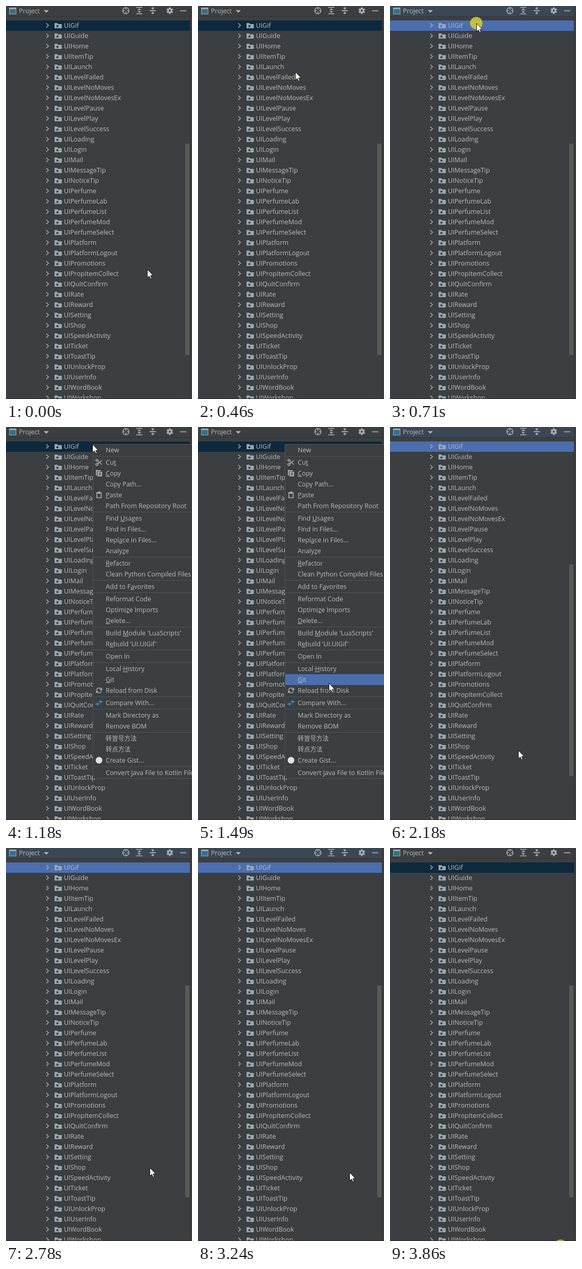
Recreate the animation shown at these times as an HTML page with a canvas. Size 360 by 760 pixels, loop 3950 ms.

```html
<!DOCTYPE html>
<html lang="en">
<head>
<meta charset="utf-8">
<title>Project tree</title>
<style>
html, body { margin: 0; width: 100%; height: 100%; overflow: hidden; background: #3c3f41; }
canvas { display: block; width: 360px; height: 760px; }
</style>
</head>
<body>
<canvas id="stage"></canvas>
<script>
const W = 360, H = 760, LOOP = 3950, TICK = 77;
const canvas = document.getElementById('stage');
const dpr = window.devicePixelRatio || 1;
canvas.width = W * dpr;
canvas.height = H * dpr;
const c = canvas.getContext('2d');

const BG = '#3c3f41', TEXT = '#bbbbbb', ICON = '#afb1b3', FOLDER = '#9aa7b0';
const BLUE = '#4b6eaf', NAVY = '#0d293e', LINE = '#515355', DARK = '#323436', SKY = '#3592c4';
const FONT = '12.5px "Open Sans", "Noto Sans", sans-serif';
const CJK = '12px "Noto Sans CJK SC", "Noto Sans CJK", sans-serif';

const names = ('Gif Guide Home ItemTip Launch LevelFailed LevelNoMoves LevelNoMovesEx LevelPause ' +
  'LevelPlay LevelSuccess Loading Login Mail MessageTip NoticeTip Perfume PerfumeLab PerfumeList ' +
  'PerfumeMod PerfumeSelect Platform PlatformLogout Promotions PropItemCollect QuitConfirm Rate ' +
  'Reward Setting Shop SpeedActivity Ticket ToastTip UnlockProp UserInfo WordBook Workshop')
  .split(' ').map(n => 'UI' + n);

// "-" is a separator, "_" marks the mnemonic letter
const items = ("New|-|Cu_t|_Copy|Copy Path...|_Paste|Path From Repository Root|-|Find _Usages|" +
  "Find in Files...|Repl_ace in Files...|Analy_ze|-|_Refactor|Clean Python Compiled Files|-|" +
  "Add to F_avorites|-|Reformat Code|Optimi_ze Imports|_Delete...|-|Build _Module 'LuaScripts'|" +
  "R_ebuild 'UI.UIGif'|-|Open In|-|Local _History|_Git|Reload from Disk|-|Compare With...|-|" +
  "Mark Directory as|Remove BOM|-|转冒号方法|转点方法|Create Gist...|-|Convert Java File to Kotlin File").split('|');

const smooth = u => u * u * (3 - 2 * u);
const speedUp = u => u * u;
const slowDown = u => 1 - (1 - u) ** 3;
const drift = u => u ** 1.15;

// Pointer moves, timed in ticks
const home = { x: 273, y: 509 };
const moves = [
  { from: 0, to: 7, x: 167, y: 33, ease: smooth },
  { from: 15, to: 19, x: 253, y: 495, ease: speedUp },
  { from: 19, to: 25, x: 248, y: 625, ease: slowDown },
  { from: 31, to: 32, x: 276, y: 620, ease: smooth },
  { from: 35, to: 39, x: 288, y: 606, ease: smooth },
  { from: 41, to: 47, x: 330, y: 769, ease: drift }
];

function pointerAt(tick) {
  let { x, y } = home;
  for (const m of moves) {
    const k = m.ease(Math.min(1, Math.max(0, (tick - m.from) / (m.to - m.from))));
    x += (m.x - x) * k;
    y += (m.y - y) * k;
  }
  return [Math.round(x), Math.round(y)];
}

function rect(x, y, w, h, color = ICON) {
  c.fillStyle = color;
  c.fillRect(x, y, w, h);
}

function trace(points) {
  c.beginPath();
  for (let i = 0; i < points.length; i += 2) c.lineTo(points[i], points[i + 1]);
}

function poly(points, color = ICON) {
  trace(points);
  c.closePath();
  c.fillStyle = color;
  c.fill();
}

function line(points, width = 1.5) {
  trace(points);
  c.strokeStyle = ICON;
  c.lineWidth = width;
  c.stroke();
}

function disc(x, y, r, color) {
  c.beginPath();
  c.arc(x, y, r, 0, Math.PI * 2);
  c.fillStyle = color;
  c.fill();
}

function arc(x, y, r, from = 0, to = 2) {
  c.beginPath();
  c.arc(x, y, r, from * Math.PI, to * Math.PI);
  c.strokeStyle = ICON;
  c.lineWidth = 1.5;
  c.stroke();
}

function label(str, x, y, font = FONT) {
  c.font = font;
  c.fillStyle = TEXT;
  c.fillText(str, x, y);
}

function at(x, y, paint) {
  c.save();
  c.translate(x, y);
  paint();
  c.restore();
}

// Paints the same shape n times around the current centre
function spin(n, paint, turn = 2 * Math.PI / n) {
  for (let i = 0; i < n; i++) {
    paint();
    c.rotate(turn);
  }
}

function header(focused) {
  const bg = focused ? '#3b4754' : BG;
  rect(0, 0, 356, 20, bg);
  rect(0, 20, 356, 1, DARK);
  rect(6, 3, 14, 13, FOLDER);
  rect(7, 6, 12, 9, '#34718a');
  label('Project', 25, 14);
  poly([73, 8, 83, 8, 78, 13]);

  at(232, 9, () => {
    arc(0, 0, 6);
    spin(4, () => rect(-0.75, 2, 1.5, 4));
  });
  at(258, 9, () => spin(2, () => {
    rect(-6, -7, 12, 1.5);
    poly([0, -4.5, 3.5, -1, -3.5, -1]);
  }));
  at(284, 9, () => spin(2, () => {
    rect(-6, -0.75, 12, 1.5);
    rect(-0.7, -7, 1.4, 2);
    poly([0, -2, 3.5, -5.5, -3.5, -5.5]);
  }));
  at(317, 9, () => {
    spin(6, () => rect(-1.5, -6.5, 3, 4));
    disc(0, 0, 4.8, ICON);
    disc(0, 0, 2, bg);
  });
  rect(337, 8.5, 12, 1.6);
}

function tree(focused) {
  const rowColor = focused ? BLUE : NAVY;
  rect(0, 28, 356, 20, rowColor);
  names.forEach((name, i) => {
    at(0, 38 + i * 20, () => {
      line([78, -4.5, 82.3, -0.5, 78, 3.5], 1.4);
      poly([94, -5, 99, -5, 101, -3, 108, -3, 108, 5, 94, 5], FOLDER);
      disc(99.5, 1, 2, i ? '#30363a' : rowColor);
      label(name, 112, 4);
    });
  });
  rect(347, 266, 8, 409, '#585a5c');
  rect(356, 0, 1, H, DARK);
  rect(0, 759, W, 1, '#2b2b2b');
}

const icons = {
  'Cu_t'() {
    for (const side of [-1, 1]) {
      arc(-4, side * 4, 2);
      line([-2.5, side * 2.8, 5.5, side * -4]);
    }
  },
  '_Copy'() {
    rect(-6, -6, 9, 2);
    rect(-6, -6, 2, 10);
    rect(-3, -3, 9, 9);
    for (let y = -1; y < 5; y += 2) rect(-1, y, 5, 1, BG);
  },
  '_Paste'() {
    rect(-5, -5, 10, 11);
    rect(-3.4, -3.4, 6.8, 7.8, BG);
    rect(-2.5, -6.5, 5, 4);
  },
  'Reload from Disk'() {
    spin(2, () => {
      arc(0, 0, 4.8, 1.05, 1.85);
      poly([6, -5.5, 6, -0.5, 1.2, -0.5]);
    });
  },
  'Compare With...'() {
    spin(2, () => {
      rect(-7, 1.2, 5, 2, SKY);
      poly([-3.5, -1.5, 0.5, 2.2, -3.5, 6], SKY);
    });
  },
  'Create Gist...'() {
    disc(0, 0, 6.5, '#dfe1e5');
  }
};

function menu(py) {
  rect(168, 33, W - 168, 647, LINE);
  rect(169, 34, W - 169, 645, BG);
  let y = 34;
  for (const item of items) {
    if (item === '-') {
      rect(169, y + 1, W - 169, 1, LINE);
      y += 3;
      continue;
    }
    if (py > 36 && py >= y && py < y + 21) rect(169, y, W - 169, 21, BLUE);
    if (icons[item]) at(180, y + 10.5, icons[item]);
    const text = item.replace('_', ''), mark = item.indexOf('_');
    label(text, 193, y + 15, text.charCodeAt(0) > 255 ? CJK : FONT);
    if (mark >= 0) {
      const x = 193 + c.measureText(text.slice(0, mark)).width;
      rect(x, y + 16, c.measureText(text[mark]).width, 1, TEXT);
    }
    y += 21;
  }
}

function pointer(x, y) {
  at(x + 0.5, y + 0.5, () => {
    poly([0, 0, 0, 16, 3.7, 12.7, 6.2, 18, 8.6, 17, 6.2, 11.7, 11, 11.5], '#fff');
    c.strokeStyle = '#111';
    c.lineWidth = 1;
    c.stroke();
  });
}

function draw(time) {
  const tick = Math.floor(time / TICK);
  const [x, y] = pointerAt(tick);
  const open = tick >= 11 && tick < 28;
  const focused = tick >= 9 && tick < 50 && !open;
  const rightClick = tick === 8 || tick === 9;
  const leftClick = tick === 27 || tick >= 50;
  c.setTransform(dpr, 0, 0, dpr, 0, 0);
  rect(0, 0, W, H, BG);
  header(focused);
  tree(focused);
  if (open) menu(y);
  if (rightClick) disc(x, y, 12, 'rgba(222, 212, 40, 0.82)');
  if (leftClick) disc(x, y, 12, 'rgba(222, 180, 40, 0.82)');
  pointer(x, y);
}

const start = performance.now();
function frame() {
  draw((performance.now() - start) % LOOP);
  requestAnimationFrame(frame);
}
frame();
</script>
</body>
</html>
```
